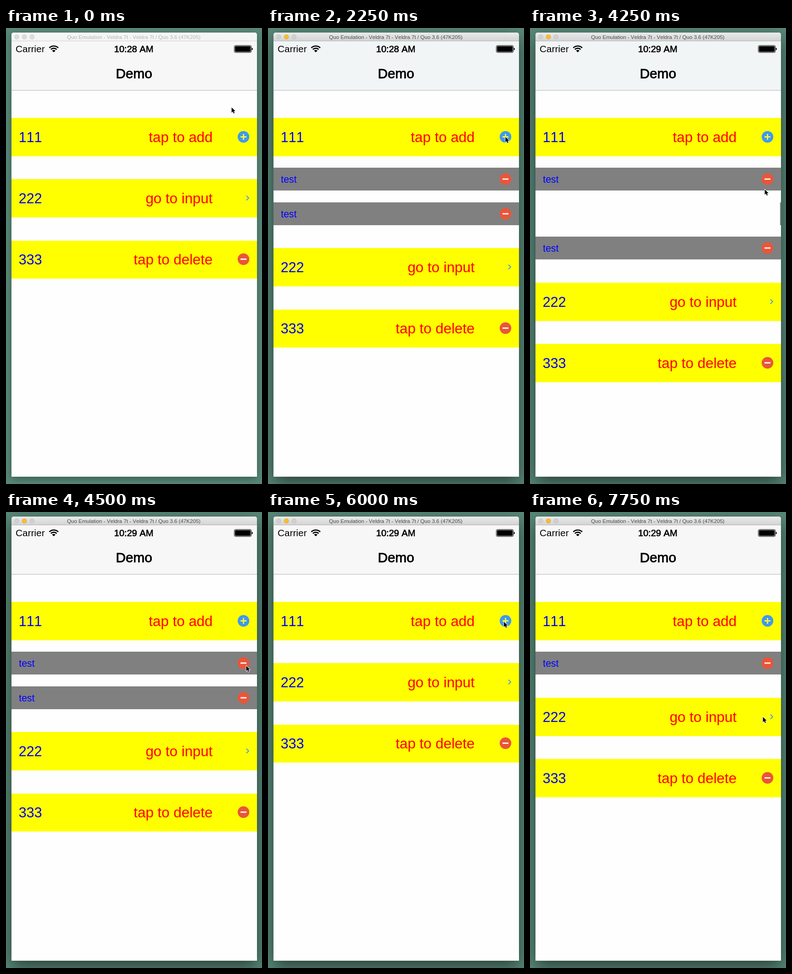
An HTML page with a canvas for the animation above (8 s loop, 560 by 999 pixels).

```html
<!DOCTYPE html>
<html lang="en">
<head>
<meta charset="utf-8">
<title>Demo</title>
<style>
html, body { margin: 0; width: 100%; height: 100%; overflow: hidden; background: #568575; }
canvas { display: block; width: 560px; height: 999px; }
</style>
</head>
<body>
<canvas id="stage" width="560" height="999"></canvas>
<script>
const ctx = document.getElementById('stage').getContext('2d');
const FONT = '"Liberation Sans", Arial, sans-serif';
const LOOP = 8000, STEP = 250, WAKE = 1250, SLIDE = 500, GLIDE = 1000;
const LEFT = 12, TOP = 10, WIDTH = 537, HEIGHT = 973;
const ICON_X = 519.5;
const BLUE = '#4099ee', RED = '#ea5539';

// Small rows from top to bottom
const ROWS = [
  { added: 750, removed: 4500 },
  { added: 1750, removed: 4000 },
  { added: 3000, removed: 5000 },
  { added: 6250, removed: Infinity }
];

// Places the pointer visits and when it gets there
const STOPS = [
  { at: 0, x: 493.5, y: 174 },
  { at: 750, x: 519.3, y: 238.7 },
  { at: 4000, x: 519, y: 406 },
  { at: 4250, x: 513.5, y: 353.7 },
  { at: 4500, x: 525.5, y: 337 },
  { at: 6000, x: 516, y: 240.5 },
  { at: 7750, x: 509.5, y: 449 }
];

const clamp = p => Math.min(1, Math.max(0, p));
const smooth = p => p * p * (3 - 2 * p);
const settle = p => 1 - (1 - clamp(p)) ** 8;

// Phone points to stage pixels
const toY = pt => Math.round(29.2 + pt * WIDTH / 320);

// Rows enter from the right and leave the same way
function rowShift(row, t) {
  const entering = 1 - settle((t - row.added) / SLIDE);
  const leaving = settle((t - row.removed) / SLIDE);
  return WIDTH * (entering + leaving);
}

function pointerAt(t) {
  const i = STOPS.findIndex(s => s.at > t);
  if (i < 0) return STOPS[STOPS.length - 1];
  const a = STOPS[i - 1], b = STOPS[i];
  const from = Math.max(a.at, b.at - GLIDE);
  const p = smooth(clamp((t - from) / (b.at - from)));
  return { x: a.x + (b.x - a.x) * p, y: a.y + (b.y - a.y) * p };
}

function rect(x, y, w, h, color) {
  ctx.fillStyle = color;
  ctx.fillRect(x, y, w, h);
}

function band(x, fromPt, toPt, color) {
  rect(x, toY(fromPt), WIDTH, toY(toPt) - toY(fromPt), color);
}

function rounded(x, y, w, h, r) {
  ctx.beginPath();
  ctx.roundRect(x, y, w, h, r);
}

function disc(x, y, r, color) {
  ctx.fillStyle = color;
  ctx.beginPath();
  ctx.arc(x, y, r, 0, Math.PI * 2);
  ctx.fill();
}

function line(points, width, color) {
  ctx.beginPath();
  points.forEach(([x, y]) => ctx.lineTo(x, y));
  ctx.lineWidth = width;
  ctx.strokeStyle = color;
  ctx.stroke();
}

function text(str, x, y, size, color, align = 'left', extra = 0) {
  ctx.font = `${size}px ${FONT}`;
  ctx.fontKerning = 'none';
  ctx.textAlign = align;
  ctx.fillStyle = ctx.strokeStyle = color;
  ctx.fillText(str, x, y);
  if (extra) {
    ctx.lineWidth = extra;
    ctx.strokeText(str, x, y);
  }
}

function windowPath() {
  rounded(LEFT, TOP, WIDTH, HEIGHT, [5, 5, 0, 0]);
}

function drawDesktop(active) {
  rect(0, 0, 560, 999, '#598979');
  ctx.save();
  ctx.shadowColor = `rgba(0,0,0,${active ? 0.55 : 0.35})`;
  ctx.shadowBlur = active ? 36 : 18;
  ctx.shadowOffsetY = active ? 12 : 5;
  ctx.fillStyle = '#fefefe';
  windowPath();
  ctx.fill();
  ctx.restore();
}

function drawTitleBar(active) {
  const g = ctx.createLinearGradient(0, TOP, 0, 28);
  g.addColorStop(0, active ? '#ebebeb' : '#f7f7f7');
  g.addColorStop(1, active ? '#d3d3d3' : '#f3f3f3');
  rect(LEFT, TOP, WIDTH, 18, g);
  rect(LEFT, 28, WIDTH, 1, active ? '#b4b4b4' : '#d2d2d2');
  for (let i = 0; i < 3; i++) {
    const x = 23.5 + i * 16.75, lit = active && i === 1;
    disc(x, 19.5, 5.2, lit ? '#dfa023' : active ? '#bdbdbd' : '#c9c9c9');
    disc(x, 19.5, 4.5, lit ? '#fdbb2d' : active ? '#d0d0d0' : '#dcdcdc');
  }
  text('Quo Emulation - Veldra 7t - Veldra 7t / Quo 3.6 (47K205)',
    279.5, 23.5, 11.6, active ? '#484848' : '#b2b2b2', 'center');
}

function drawWifi(x, y) {
  const a = -Math.PI * 0.75, b = -Math.PI * 0.25;
  ctx.strokeStyle = ctx.fillStyle = '#000';
  ctx.lineWidth = 2.7;
  for (const r of [13.8, 9]) {
    ctx.beginPath();
    ctx.arc(x, y, r, a, b);
    ctx.stroke();
  }
  ctx.beginPath();
  ctx.moveTo(x, y);
  ctx.arc(x, y, 5.4, a, b);
  ctx.fill();
}

function drawBattery(x, y) {
  ctx.strokeStyle = ctx.fillStyle = '#000';
  ctx.lineWidth = 1;
  rounded(x, y, 37.5, 15.4, 3);
  ctx.stroke();
  rounded(x + 1.5, y + 1.5, 34.5, 12.4, 1.8);
  ctx.fill();
  rounded(x + 38.3, y + 5.1, 2.2, 5.2, [0, 2, 2, 0]);
  ctx.fill();
}

function drawHeader(t, active) {
  const tinted = active && t < 4500;
  rect(LEFT, 29, WIDTH, 107, tinted ? '#f1f5f6' : '#f7f7f7');
  rect(LEFT, 136, WIDTH, 1, '#b4b4b4');
  text('Carrier', 21, 53, 20.9, '#000');
  drawWifi(104.5, 53.3);
  text(t < 3500 ? '10:28 AM' : '10:29 AM', 279.5, 53, 20.1, '#000', 'center', 0.7);
  drawBattery(499.3, 38.3);
  text('Demo', 280, 109.5, 29.9, '#000', 'center', 0.9);
}

function drawPlus(x, y) {
  disc(x, y, 12.7, BLUE);
  line([[x - 6.5, y], [x + 6.5, y]], 2.8, '#f4f73c');
  line([[x, y - 6.5], [x, y + 6.5]], 2.8, '#f4f73c');
}

function drawMinus(x, y) {
  disc(x, y, 12.7, RED);
  line([[x - 6.5, y], [x + 6.5, y]], 2.8, '#fff4ee');
}

function drawChevron(x, y) {
  line([[x + 6.4, y - 5], [x + 11.4, y], [x + 6.4, y + 5]], 1.8, BLUE);
}

function drawSection(pt, label, action, icon) {
  const y = toY(pt + 25);
  band(LEFT, pt, pt + 50, '#ff0');
  text(label, 27.8, y + 11, 30.6, '#0000f0');
  text(action, 452, y + 11, 31.4, '#f00', 'right');
  icon(ICON_X, y - 0.5);
}

function drawRow(pt, shift) {
  const y = toY(pt + 15);
  band(LEFT + shift, pt, pt + 30, '#808080');
  text('test', 28.2 + shift, y + 8, 21.4, '#00f');
  drawMinus(ICON_X + shift, y);
}

function drawPointer({ x, y }) {
  ctx.beginPath();
  [[0, 0], [0, 11.4], [2.6, 9], [4.5, 13.2], [6.5, 12.3], [4.7, 8.2], [8.2, 8.1]]
    .forEach(([dx, dy]) => ctx.lineTo(x + dx, y + dy));
  ctx.closePath();
  ctx.lineJoin = 'round';
  ctx.lineWidth = 1.8;
  ctx.strokeStyle = '#fff';
  ctx.stroke();
  ctx.fillStyle = '#000';
  ctx.fill();
  ctx.lineJoin = 'miter';
}

function draw(t) {
  const active = t >= WAKE;
  const rows = ROWS.filter(r => active && t >= r.added && t < r.removed + SLIDE);
  const push = rows.length * 45;
  drawDesktop(active);
  ctx.save();
  windowPath();
  ctx.clip();
  drawTitleBar(active);
  drawHeader(t, active);
  drawSection(100, '111', 'tap to add', drawPlus);
  rows.forEach((row, i) => drawRow(165 + i * 45, rowShift(row, t)));
  drawSection(180 + push, '222', 'go to input', drawChevron);
  drawSection(260 + push, '333', 'tap to delete', drawMinus);
  ctx.restore();
  drawPointer(pointerAt(t));
}

const start = performance.now();
function tick() {
  const t = (performance.now() - start) % LOOP;
  draw(Math.floor(t / STEP) * STEP);
  requestAnimationFrame(tick);
}
tick();
</script>
</body>
</html>
```
